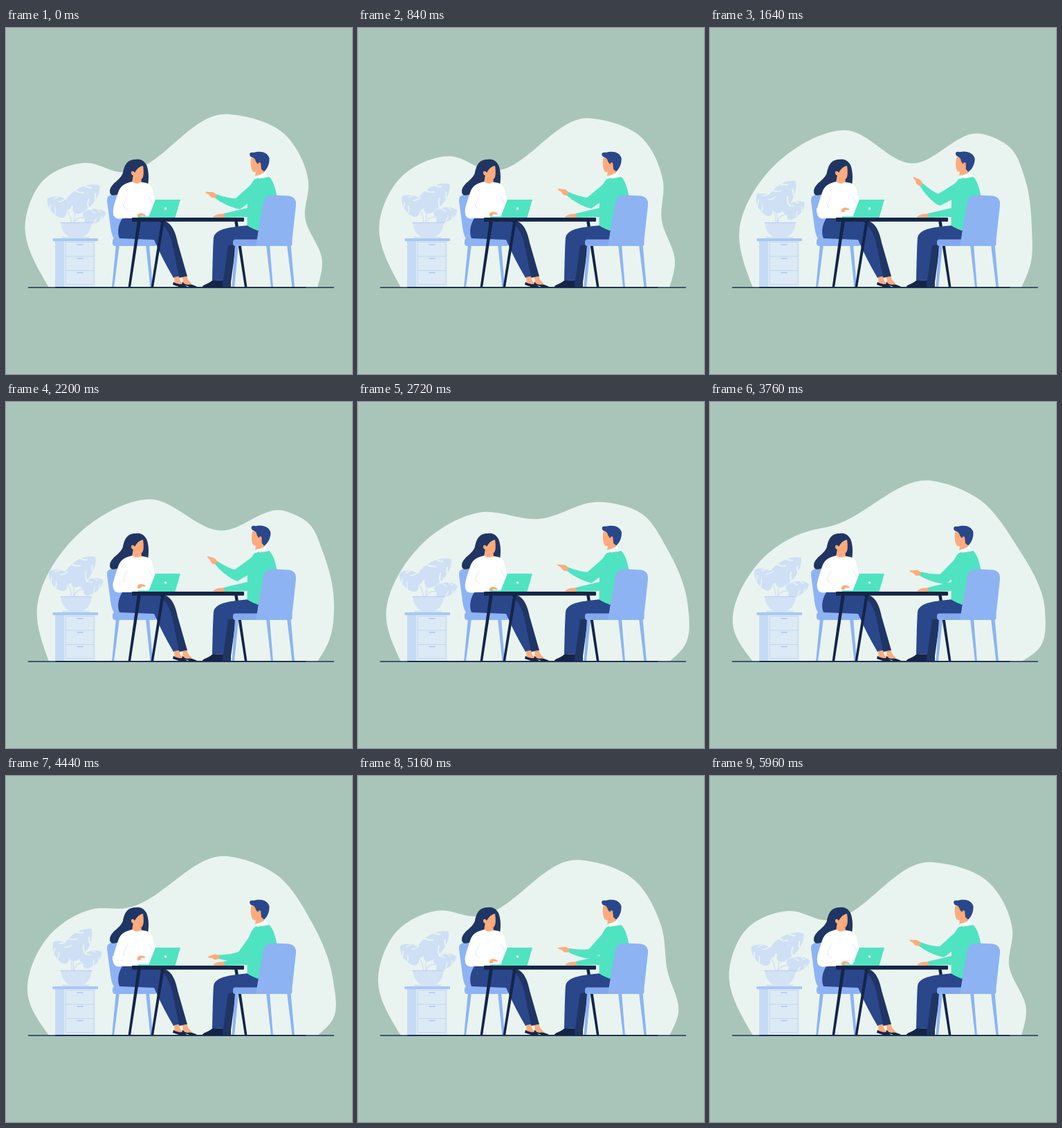
An HTML page for the animation above (6120 ms loop, 500 px wide and 500 px high).

```html
<!DOCTYPE html>
<html lang="en">
<head>
<meta charset="utf-8">
<title>Meeting</title>
<style>
  html, body { margin: 0; height: 100%; overflow: hidden; background: #a9c5b9; }
  svg { display: block; width: 100vw; height: 100vh; }
  .blob { fill: #e9f4f0; }
  .chair { fill: #8db3f3; }
  .navy { fill: #1f3563; }
  .blue { fill: #2a478b; }
  .dark { fill: #142548; }
  .skin { fill: #ffab7b; }
  .mint { fill: #50e3c2; }
  .white { fill: #fff; }
  .leaf { fill: #cfe0f5; }
  .line { fill: none; stroke-linecap: round; stroke-linejoin: round; }
  .stem { stroke: #cfe0f5; stroke-width: 1.4; }
</style>
</head>
<body>
<svg viewBox="0 0 500 500">
  <defs>
    <g id="leaf">
      <path d="M0 0C-6-6-6-15 4-17C20-20 35-12 41 0C35 12 20 20 4 17C-6 15-6 6 0 0Z"/>
      <path class="line" stroke="#e9f4f0" stroke-width="1.9"
        d="M13-20Q14-12 20-7M26-18Q26-11 31-6M13 20Q14 12 20 7M26 18Q26 11 31 6"/>
    </g>
  </defs>

  <path id="blob" class="blob"/>

  <g id="plant">
    <g id="leafR" class="leaf">
      <path class="line stem" d="M98 283Q102 271 115 275"/>
      <use href="#leaf" transform="translate(115 275) rotate(-15) scale(.75 .62)"/>
    </g>
    <g id="leafC" class="leaf">
      <path class="line stem" d="M97 283Q101 270 99 259"/>
      <use href="#leaf" transform="translate(97 257) rotate(-37) scale(1.18 .9)"/>
    </g>
    <g id="leafL" class="leaf">
      <path class="line stem" d="M95 283Q93 269 87 263"/>
      <use href="#leaf" transform="translate(87 264) rotate(212) scale(.79 .78)"/>
    </g>
    <path fill="#d3e3f5" d="M79 281H124C123 291 119 298 111 302H92C84 298 80 291 79 281Z"/>
    <path class="line" stroke="#b4cef0" d="M79 281.3H124"/>
  </g>

  <g id="cabinet">
    <path fill="#d3e3f5" d="M81 301.5H120V304H81Z"/>
    <path fill="#dceaf5" d="M84 307H129V374H84Z"/>
    <path fill="#c5dbf4" d="M71 307H84V374H71Z"/>
    <rect x="67.5" y="304" width="65.5" height="4" rx=".6" fill="#a8c7f2"/>
    <path class="line" stroke="#b9d3f2" stroke-width=".8" d="M86.5 309.5H127V370.5H86.5ZM86.5 330H127M86.5 350.5H127"/>
    <path class="line" stroke="#a8c7f2" stroke-width="1.3" d="M103 313H111M103 333H111M103 353.5H111"/>
  </g>

  <g class="chair">
    <path d="M146 250Q145 242 153 241L175 240V306H158Q153 303 151 288Z"/>
    <rect x="154" y="304" width="64" height="11" rx="4"/>
    <path d="M159 313H164L156 375H153ZM202 313H207L212 375H208.500Z"/>
  </g>

  <g id="woman">
    <path class="navy" d="M215 279H230C241 284 245 296 248 310L262 359L250 361Z"/>
    <path class="blue" d="M168 275H212C228 280 237 295 241 315L250 359L242 361Q226 334 214 306L164 304C160 294 163 283 168 275Z"/>
    <path class="skin" d="M243 360L250 359L252 366L258 371L244 370ZM255 360L261 359L264 365L271 372L256 369Z"/>
    <path class="dark" d="M242 367Q248 371 253 370Q259 371 262 374H250L241 371ZM255 367Q260 372 265 370.500Q272 371 276 374H265L257 371L254 373Z"/>
    <path class="navy" d="M187 190C174 190 171 200 169 209C166 220 151 224 150 236C150 241 153 243 160 241L186 230L205 227C207 216 206 205 203 198C199 191 194 189 187 190Z"/>
    <path class="skin" d="M184 211L182 224Q188 228 196 224L195 215Z"/>
    <path class="white" d="M183 222C172 224 165 228 162 238C158 250 154 260 155 268C156 276 163 276 168 275L206 275L209 264L215 250C213 238 212 229 207 226C202 223 198 223 195 223Q188 227 183 222Z"/>
    <path class="skin" d="M182 207C180 208 181 213 184 213C186 218 191 220 195 219C200 217 199 206 198 199Q191 200 186 209Q184 206 182 207Z"/>
    <path class="line" stroke="#dbe8ef" stroke-width=".9" d="M175 244Q171 251 169 258M170 257Q172 262 176 263M207 243L211 252"/>
    <g id="typing">
      <path class="white" d="M156 259C153 268 156 276 164 275.500L191 274L190 267.500L170 262Z"/>
      <path class="skin" d="M189.500 271Q191 267 196 267.500Q201 269 202 271.500L200 272L196 271L194 273.500H190Z"/>
    </g>
  </g>

  <g id="table">
    <path class="dark" d="M190 278H195L180 375H176.500ZM224.500 278H229L213 375H209.500ZM330 278H334.500L348.500 375H345Z"/>
    <path class="mint" d="M216 248H252L244.500 274H191V272.200H206.500Z"/>
    <circle cx="230.500" cy="261" r="1.8" fill="#fff"/>
    <rect class="dark" x="182" y="274" width="162" height="5.800" rx="1"/>
  </g>

  <g id="man">
    <path class="navy" d="M325 308H345L332 316L325 367V374H312L318 314Z"/>
    <path class="blue" d="M352 285C325 288 303 289 300 303Q299 315 298 364L314 365L321 314L365 310V288Z"/>
    <path class="dark" d="M299 364L313 365V374H284C284 371 293 370 299 364Z"/>
    <path class="skin" d="M317 268L307 269Q300 271 299 273.500L317 274Z"/>
    <path class="mint" d="M315 268L349 260V273L316 274Z"/>
    <path class="mint" d="M362 216C354 222 350 233 349 246L348.500 285C353 289 360 291 364 293L376 285L391.500 243C389 230 386 220 380 215Z"/>
    <path class="white" d="M359 218Q361 214 367 213L374 208L380 215Q372 217 359 218Z"/>
    <g id="head">
      <path class="skin" d="M354 188C353 197 354 204 357 208L361 208.500L360 214Q368 212 373 209L372 195L365 186Z"/>
      <path class="blue" d="M352 182Q353 179 358 180C367 177 378 179 380.500 188C381 196 378 203 373 207.500L369 204L368 195Q365 193 364 197L361 193Q360 188 356 187Q352 186 352 182Z"/>
    </g>
    <g id="upper">
      <path class="mint" d="M364 216L351 229L331 247Q329 260 338 262L350 253L371 238Z"/>
      <g id="fore">
        <path class="skin" d="M304.500 240.500L299 237Q294 237 288.500 236.500Q287.500 238.500 293 240.500L296 244.500Q300 246 303.500 245.500Z"/>
        <path class="mint" d="M304.500 240.300Q319 246 334 246.500Q342 248 342 255Q340 263 332 260.500Q316 256 302.500 246Z"/>
      </g>
    </g>
  </g>

  <g class="chair">
    <rect x="328" y="305.500" width="85.500" height="9.500" rx="3.500" fill="#82a9ec"/>
    <path d="M372 250Q375 241 386 241.500L408 242.500Q420 244 419 256L413 311Q413 315 409 315H361Z"/>
    <path d="M331 313H336L330 375H326.500ZM376 313H381L386 375H383ZM406 313H411.500L417 375H413.500Z"/>
  </g>

  <path class="line" stroke="#1f3050" stroke-width="1.6" d="M32.500 375H473.500"/>
  <path class="line" stroke="#142548" stroke-width="1.6" d="M72 374.700H433"/>
</svg>

<script>
const LOOP = 6120, STEP = 40, REST = 280, SWING = 2840;
const $ = id => document.getElementById(id);

// Backdrop poses. Points: left side, left shoulder, left top, valley,
// right top, right shoulder, right side, waist, bulge.
const twoHills = [28,279, 55,219, 117,195, 163,208, 320,124.5, 402,153, 437,222, 432,272, 457,340];
const saddle = [45,300, 105,190, 210,139, 315,189, 405,158, 440,177, 459,218, 473,290, 466,343];
const ramp = [37,318, 80,220, 148,177, 215,161, 320,131, 393,150, 440,208, 478,290, 476,354];
const peak = [34,328, 72,230, 132,190, 178,179, 320,113.5, 388,140, 442,206, 484,300, 477,354];
const poses = [[400, twoHills], [2050, saddle], [3160, ramp], [3800, peak], [5900, twoHills]];

// Monotone cubic through coordinate k of the poses: turns only at extremes.
function coordinate(t, k) {
  const rate = i => (poses[i + 1][1][k] - poses[i][1][k]) / (poses[i + 1][0] - poses[i][0]);
  const speed = i => {
    if (i === 0 || i === poses.length - 1) return 0;
    const a = rate(i - 1), b = rate(i);
    return a * b <= 0 ? 0 : 2 * a * b / (a + b);
  };
  let i = 0;
  while (i < poses.length - 2 && t > poses[i + 1][0]) i++;
  const [t0, from] = poses[i], [t1, to] = poses[i + 1];
  const w = t1 - t0, u = Math.min(1, Math.max(0, (t - t0) / w)), r = 1 - u;
  return from[k] * (1 + 2 * u) * r * r + to[k] * u * u * (3 - 2 * u)
    + w * u * r * (speed(i) * r - speed(i + 1) * u);
}

function outline(t) {
  const pts = [[62, 375]];
  for (let k = 0; k < twoHills.length; k += 2) pts.push([coordinate(t, k), coordinate(t, k + 1)]);
  return [...pts, [450, 375]];
}

// Smooth path with tangents weighted by chord length.
function curve(pts) {
  const last = pts.length - 1, len = [], dir = [], tan = [];
  for (let i = 0; i < last; i++) {
    const [dx, dy] = [0, 1].map(k => pts[i + 1][k] - pts[i][k]);
    len[i] = Math.hypot(dx, dy);
    dir[i] = [dx / len[i], dy / len[i]];
  }
  for (let i = 1; i < last; i++) {
    const a = len[i - 1], b = len[i];
    tan[i] = dir[i].map((v, k) => (dir[i - 1][k] * b + v * a) / (a + b));
  }
  const relax = (d, next) => d.map((v, k) => 1.5 * v - 0.5 * next[k]);
  tan[0] = relax(dir[0], tan[1]);
  tan[last] = relax(dir[last - 1], tan[last - 1]);

  let d = `M${pts[0]}`;
  for (let i = 0; i < last; i++) {
    const c1 = pts[i].map((v, k) => v + tan[i][k] * len[i] / 3);
    const c2 = pts[i + 1].map((v, k) => v - tan[i + 1][k] * len[i] / 3);
    d += `C${c1} ${c2} ${pts[i + 1]}`;
  }
  return d + 'Z';
}

// Every joint swings out and back twice: degrees for each swing, and a lead in ms.
const joints = [
  { id: 'leafL', pivot: '95 282', turns: [13, 14], lead: 250 },
  { id: 'leafC', pivot: '96 282', turns: [-12, -12], lead: 60 },
  { id: 'leafR', pivot: '97 282', turns: [-20, -17], lead: 0 },
  { id: 'typing', pivot: '160 268', turns: [-13, -13], lead: 60 },
  { id: 'head', pivot: '368 212', turns: [6, 0], lead: -150 },
  { id: 'upper', pivot: '366 228', turns: [10, -13], lead: 0 },
  { id: 'fore', pivot: '334 254', turns: [12, -9], lead: 0 }
];

function angle(t, { turns, lead }) {
  const x = Math.min(2 * SWING, Math.max(0, t - REST)) + lead;
  const turn = turns[Math.floor(x / SWING) & 1];
  return turn * Math.abs(Math.sin(Math.PI * x / SWING)) ** 3;
}

function draw(t) {
  $('blob').setAttribute('d', curve(outline(t)));
  for (const j of joints)
    $(j.id).setAttribute('transform', `rotate(${angle(t, j)} ${j.pivot})`);
}

const start = performance.now();
function tick() {
  const t = (performance.now() - start) % LOOP;
  draw(Math.floor(t / STEP) * STEP);
  requestAnimationFrame(tick);
}
tick();
</script>
</body>
</html>
```
